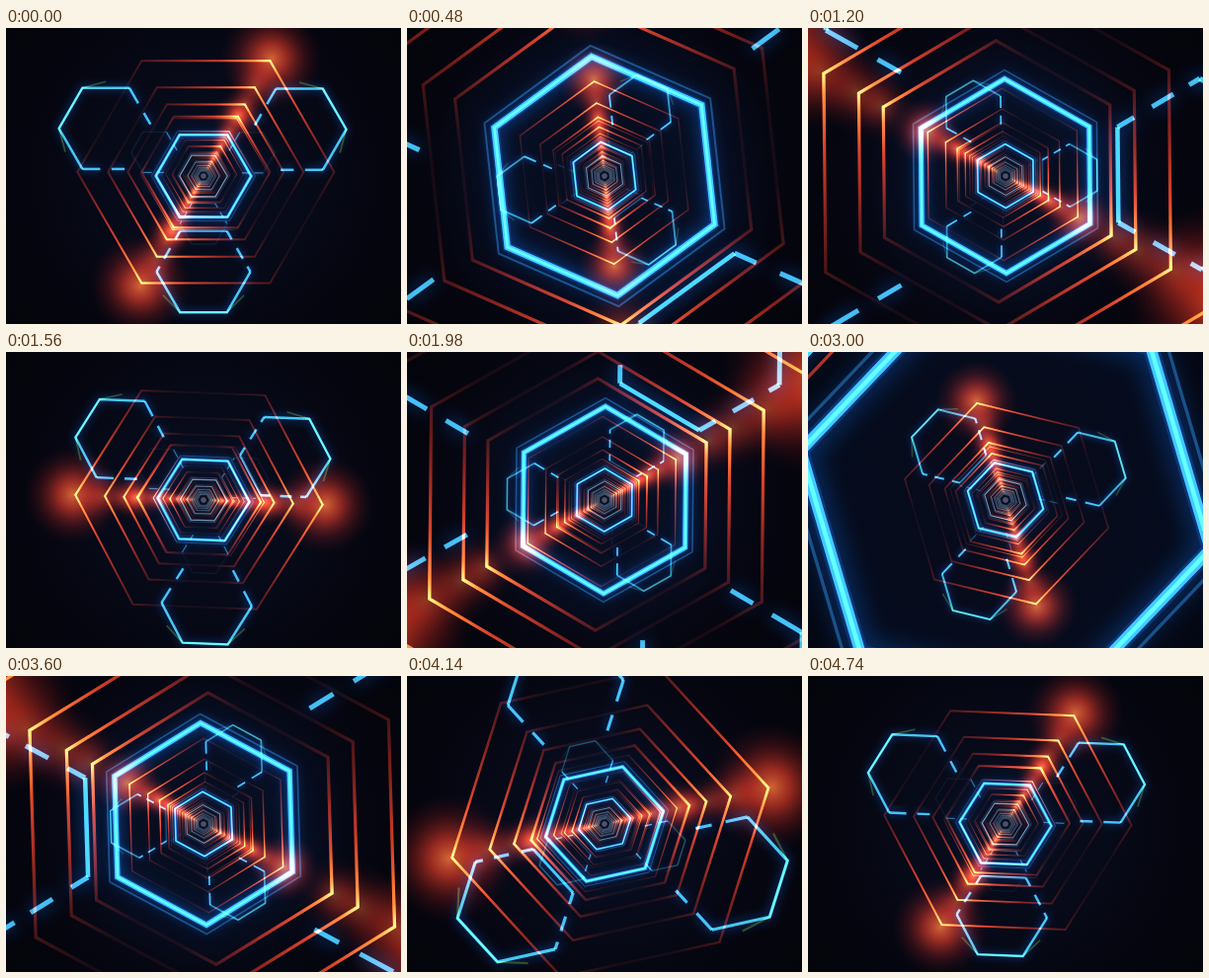
Recreate the animation shown at these times as an HTML page with a canvas. Size 400 px wide and 300 px high, loop 4800 ms.

```html
<!DOCTYPE html>
<html lang="en">
<head>
<meta charset="utf-8">
<title>Neon hexagon tunnel</title>
<style>
html, body { margin: 0; width: 100%; height: 100%; overflow: hidden; background: #04040b; }
canvas { display: block; width: 400px; height: 300px; }
</style>
</head>
<body>
<canvas id="stage" width="400" height="300"></canvas>
<script>
const ctx = document.getElementById('stage').getContext('2d');
const LOOP = 4800, STEP = 60, TURN = 4770;
const CELLS = 6;        // tunnel sections passed per loop
const DEPTH = 8;        // sections drawn ahead
const RAD = Math.PI / 180;
const HOT = -60 * RAD;  // axis of the hot corners
const EMBERS = [130, 99, 79, 65];

// Side cells: direction, distance, dash spans measured from the outer corner
const LONG = [[0, .38], [.62, .9]];
const SHORT = [[0, .13], [.32, .58], [.8, 1]];
const SIDES = [
  { dir: 206, axis: 210, dist: 110, dashes: LONG },
  { dir: -26, axis: -30, dist: 108, dashes: LONG },
  { dir: 90, axis: 90, dist: 97, dashes: SHORT, inner: true }
];

const clamp = (x, a = 0, b = 1) => Math.min(b, Math.max(a, x));
const corner = (x, y, r, deg) => [x + r * Math.cos(deg * RAD), y + r * Math.sin(deg * RAD)];

function trace(points, closed) {
  ctx.beginPath();
  points.forEach(p => ctx.lineTo(p[0], p[1]));
  if (closed) ctx.closePath();
}

function hexagon(x, y, r) {
  trace([0, 60, 120, 180, 240, 300].map(a => corner(x, y, r, a)), true);
}

function stroke(style, width, alpha) {
  ctx.strokeStyle = style;
  ctx.lineWidth = width;
  ctx.globalAlpha = alpha;
  ctx.stroke();
}

function neon(style, width, alpha, halo) {
  ctx.shadowColor = '#0a5ac0';
  ctx.shadowBlur = halo;
  stroke(style, width, alpha);
  ctx.shadowBlur = 0;
}

function glow(x, y, r, alpha, stops) {
  const g = ctx.createRadialGradient(x, y, 0, x, y, r);
  stops.forEach(s => g.addColorStop(s[0], s[1]));
  ctx.fillStyle = g;
  ctx.globalAlpha = alpha;
  ctx.fillRect(x - r, y - r, 2 * r, 2 * r);
}

function frameRing(u) {
  const r = 48.3 / u;
  if (r > 420) return;
  const alpha = Math.min(1, 2.3 / u);
  const w = Math.max(.052 * r, .9);
  hexagon(0, 0, r);
  if (u < 2) {
    neon('#0a2850', w * 1.5, .5, r * .5);
    neon('#3ca5cd', w, .9, w * 2.5);
    stroke('#8cdcf0', w * .4, .25);
  } else {
    stroke('#82aab9', w, alpha * .8);
  }
  hexagon(0, 0, r * 1.09);
  stroke('#23699b', Math.max(w * .3, .6), .55 * alpha);
}

function sideCell(s, u) {
  const [x, y] = corner(0, 0, s.dist / u, s.dir);
  const r = 47.5 / u, w = clamp(2.5 / u, .9, 5), halo = w * 3.5;
  const solid = clamp(2.1 - u), dashed = clamp(2.6 - u);
  const at = a => corner(x, y, r, s.axis + a);
  if (solid > 0) {
    trace([-90, -30, 30, 90].map(at));
    neon('#46c3cd', w, solid * .9, halo);
    trace([-60, -30, 30, 60].map(at));
    stroke('#5a8c14', w * .7, solid * .45);
  }
  if (dashed <= 0) return;
  for (const side of [-1, 1]) {
    const a = at(90 * side), b = at(150 * side);
    const mix = k => [a[0] + (b[0] - a[0]) * k, a[1] + (b[1] - a[1]) * k];
    for (const span of s.dashes) {
      trace(span.map(mix));
      neon('#46bedc', w, dashed * .9, halo);
    }
  }
  if (s.inner) {
    trace([150, 210].map(at));
    neon('#46bedc', w * .9, dashed * clamp(1.6 - u * .9, .3), halo);
  }
}

function emberStyle(r) {
  const g = ctx.createLinearGradient(-r, 0, r, 0);
  const tones = [[0, '#ffd76e'], [.03, '#ff8228'], [.09, '#d73c19'], [.18, '#821c0e'], [.26, '#3c0e08'], [.4, '#120505']];
  for (const [p, c] of tones) {
    g.addColorStop(p, c);
    g.addColorStop(1 - p, c);
  }
  return g;
}

function embers(u) {
  const alpha = Math.min(1, 1.5 / u);
  ctx.save();
  ctx.rotate(HOT);
  ctx.translate(4.7 / u, 0);
  EMBERS.forEach((size, i) => {
    const r = size / u;
    if (r > 420) return;
    for (const end of [-1, 1]) {
      glow(end * r * 1.02, 0, r * (i ? .28 : .4), alpha * (i ? .36 : .85), [
        [0, 'rgba(255,115,45,.95)'],
        [.3, 'rgba(225,55,24,.75)'],
        [.65, 'rgba(140,25,14,.36)'],
        [1, 'rgba(60,8,8,0)']
      ]);
    }
    hexagon(0, 0, r);
    stroke(emberStyle(r), clamp(2 / u, .8, 3.2), alpha);
  });
  ctx.restore();
}

function draw(t) {
  const phase = t / TURN;
  const part = (phase * CELLS) % 1;
  ctx.setTransform(1, 0, 0, 1, 0, 0);
  ctx.globalCompositeOperation = 'source-over';
  ctx.globalAlpha = 1;
  ctx.fillStyle = '#04040b';
  ctx.fillRect(0, 0, 400, 300);
  ctx.translate(200, 150);
  ctx.rotate(-2 * Math.PI * phase);
  ctx.globalCompositeOperation = 'lighter';
  glow(0, 0, 240, 1, [[0, 'rgba(8,20,42,.5)'], [.5, 'rgba(6,12,28,.4)'], [1, 'rgba(4,4,12,0)']]);
  for (let k = DEPTH; k >= 0; k--) {
    const u = 1 - part + k;
    embers(u);
    SIDES.forEach(s => sideCell(s, u));
    frameRing(u);
  }
  ctx.globalCompositeOperation = 'source-over';
  ctx.globalAlpha = 1;
  ctx.fillStyle = '#50506a';
  ctx.beginPath();
  ctx.arc(0, 0, 2.8, 0, 7);
  ctx.fill();
}

const start = performance.now();
function tick() {
  const t = Math.max(0, performance.now() - start) % LOOP;
  draw(Math.floor(t / STEP) * STEP);
  requestAnimationFrame(tick);
}
tick();
</script>
</body>
</html>
```
